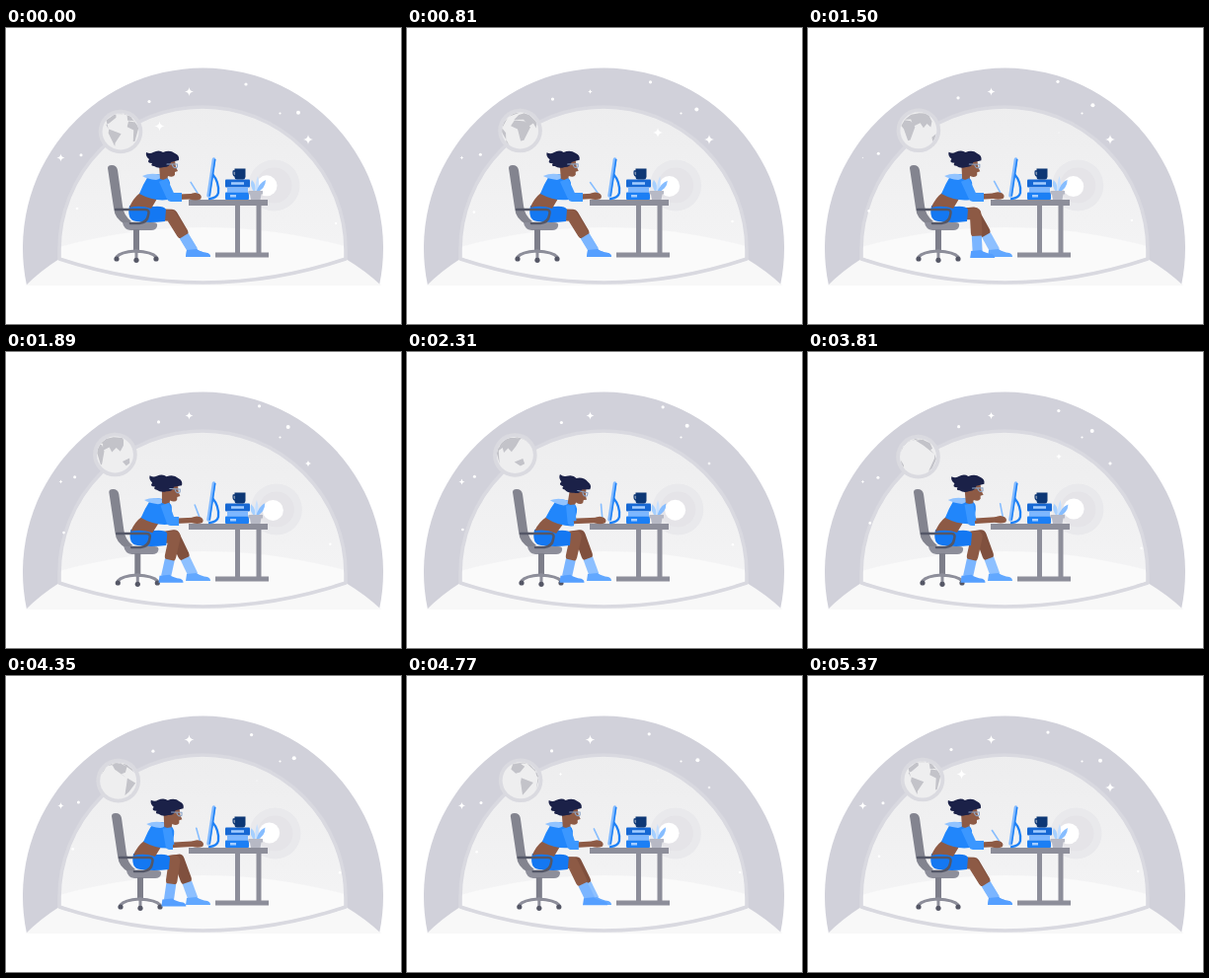
An HTML page that plays this animation: 400 by 300 pixels, repeating every 5400 ms.

```html
<!DOCTYPE html>
<html lang="en">
<head>
<meta charset="utf-8">
<title>Working under the dome</title>
<style>
html, body { margin: 0; width: 100%; height: 100%; overflow: hidden; background: #fff; }
svg { display: block; width: 100vw; height: 100vh; }
.line { fill: none; stroke-linecap: round; stroke-linejoin: round; }
.flat { stroke-linecap: butt; }
</style>
</head>
<body>
<svg viewBox="0 0 400 300">
  <defs>
    <linearGradient id="air" x1="0" y1="0" x2="0" y2="1">
      <stop offset="0" stop-color="#ededee"/><stop offset="1" stop-color="#f5f5f6"/>
    </linearGradient>
    <clipPath id="disc"><circle r="18.5"/></clipPath>
    <clipPath id="inside"><path d="M54 234V225A145 145 0 0 1 344 225V234Q200 282 54 234Z"/></clipPath>
  </defs>

  <path d="M21 261A182.5 182.5 0 1 1 378 261Z" fill="#d1d1da"/>
  <path d="M20 261Q35 246 54 234H344Q364 246 380 261Z" fill="#f8f8f8"/>
  <g clip-path="url(#inside)">
    <rect x="50" y="78" width="300" height="185" fill="url(#air)"/>
    <g id="halo"><circle r="26" fill="#e9e9ec"/><circle r="18" fill="#e5e4e8"/></g>
    <circle id="sun" r="10.5" fill="#fff"/>
    <path d="M50 223Q200 181 350 223V265H50Z" fill="#fafafa"/>
  </g>
  <path d="M54 234V225A145 145 0 0 1 344 225V234Q200 282 54 234Z" class="line" stroke="#d9d9e0" stroke-width="3.6"/>
  <g id="stars" fill="#fff"></g>

  <g id="globe">
    <circle r="22.3" fill="#dadae0"/><circle r="18.5" fill="#eeeeef"/>
    <path id="land" clip-path="url(#disc)" fill="#c3c3c9"/>
  </g>

  <g id="farLeg"></g>
  <g id="chair">
    <path d="M103 142Q103 139 107 139Q112 139 113 144L118 180Q119 190 127 196L121 199Q110 194 109 182Z" fill="#83848f"/>
    <path d="M118 197H149Q154 197 153 201Q152 205 147 205H126Q119 204 118 197Z" fill="#8d8e9a"/>
    <path d="M129 204H135V227H129Z" fill="#7d7e8a"/>
    <path d="M112 232Q116 227 131 226Q148 227 152 232M132 226V233" class="line" stroke="#8d8e9a" stroke-width="3"/>
    <g fill="#555766"><circle cx="112" cy="234" r="2.6"/><circle cx="132" cy="235.3" r="2.6"/><circle cx="152" cy="234" r="2.6"/></g>
  </g>
  <g id="nearLeg"></g>

  <g id="hips">
    <path d="M125 180Q133 177 149 181Q160 180 162 184L161 196Q145 198 132 196Q122 195 125 180Z" fill="#1478f2"/>
  </g>
  <g id="torso">
    <path d="M137 166L153 173L147 183Q136 179 125 182Q128 173 137 166Z" fill="#8d5a45"/>
    <path d="M144 150Q151 146 160 150Q167 153 166 160L164 174Q150 176 135 168Q139 158 144 150Z" fill="#2186fb"/>
    <path d="M138 150Q147 146 156 149Q158 153 152 154Q143 153 138 150Z" fill="#91c3ff"/>
  </g>
  <g id="head">
    <path d="M155 138L171 134L172 141L174 145L171 146L171 149Q169 152 164 150L163 155L156 153Z" fill="#8d5a45"/>
    <path d="M142 126Q146 128 149 126Q155 123 159 126Q166 123 171 127Q176 129 175 134Q171 135 167 136Q166 141 160 141Q154 143 150 140Q146 140 148 137Q142 137 145 133Q141 130 142 126Z" fill="#1b2148"/>
    <path d="M163 138H173.5V141Q170 143 168.5 139" class="line" stroke="#8ea6c8" stroke-width="1.1"/>
  </g>

  <g id="rest" class="line" stroke="#545767" stroke-width="2.6">
    <path d="M111 184H141Q146 184 144 190Q143 197 135 198H126"/>
  </g>

  <g fill="#8d8e9a">
    <path d="M232 179H237V230H232ZM253.5 179H258.5V230H253.5Z"/>
    <rect x="212" y="227.5" width="54" height="5"/>
    <rect x="185" y="174" width="80" height="6"/>
  </g>
  <path d="M209 148Q216 156 215 167Q214 172 206 173.2" class="line" stroke="#1d80f5" stroke-width="2.3"/>
  <path d="M210.5 133L205 170" class="line" stroke="#82baff" stroke-width="3.5"/>
  <path d="M211.7 133.5L206.3 170" class="line" stroke="#1d80f5" stroke-width="1.6"/>

  <rect x="222" y="153.5" width="25" height="8" rx="1" fill="#1768d3"/>
  <rect x="224" y="161.5" width="21" height="5" fill="#7db7ff"/>
  <rect x="222" y="166.5" width="24" height="7.5" rx="1" fill="#1c7ff4"/>
  <path d="M228 157.5H241M227 170.2H233" class="line flat" stroke="#a4cdff" stroke-width="2.5"/>
  <path d="M231.5 142.5H242.5V151Q242 153.5 240 153.5H234Q231.5 153.5 231.5 151Z" fill="#0d3775"/>
  <path d="M232 145H230.2Q229.5 150 232 150" class="line" stroke="#0d3775" stroke-width="1.3"/>
  <g id="leaves">
    <path d="M252 167Q246 160 249 154Q254 159 252 167Z" fill="#a6d0ff"/>
    <path d="M253 167Q252 157 255 150Q258 160 253 167Z" fill="#c6e0ff"/>
    <path d="M253 167Q256 157 263 154Q263 163 253 167Z" fill="#86bdff"/>
  </g>
  <path d="M245.5 165H260V168.5H258.5L257.5 174H248L247 168.5H245.5Z" fill="#b7b9c5"/>

  <g id="arm">
    <path id="forearm" class="line" stroke="#8d5a45" stroke-width="5.5"/>
    <path id="sleeve" class="line flat" stroke="#3b97ff" stroke-width="9"/>
    <g id="hand">
      <path d="M0 0L0 -13" class="line" stroke="#86bdff" stroke-width="1.6" id="pen"/>
      <path d="M-8 -2Q-2 -5 2 -2Q5 0 3 3Q-2 5 -8 3Z" fill="#8d5a45"/>
    </g>
  </g>
</svg>

<script>
const LOOP = 5400, STEP = 30, TAU = Math.PI * 2, RAD = Math.PI / 180;
const $ = id => document.getElementById(id);
const put = (id, x, y, more = "") => $(id).setAttribute("transform", `translate(${x} ${y}) ${more}`);
const mix = (a, b, k) => a + (b - a) * k;
const mix2 = (a, b, k) => [mix(a[0], b[0], k), mix(a[1], b[1], k)];
const ease = (a, b, t) => {
  const u = Math.min(1, Math.max(0, (t - a) / (b - a)));
  return u * u * (3 - 2 * u);
};
const line = pts => "M" + pts.map(p => p.join(" ")).join("L");

// Drifting dots: centre, cosine part, sine part, radius
const dots = [
  [251.5, 57, -8.5, 0, 0, -2.7, 1.6],
  [151, 73.5, -6, 1, 0, -2.5, 1.6],
  [289.5, 80.3, 6.5, 5.5, 0, -1.2, 2],
  [72, 127.5, 4, 1.3, 0, 0, 1.5],
  [277.5, 86.5, 0, 0, 0, 0, 1.1],
  [64, 180, 8, 3, -1, 6, 1.3],
  [333, 197, 1, 1, -5, -2, 1.2]
];

// Twinkles: place, then size at each beat
const beats = [0, 810, 1500, 2310, 3240, 4350, LOOP];
const twinkles = [
  [306, 113, 5, 5, 5, 2, 5, 0],
  [185.5, 64.5, 4.5, 2.2, 4, 4, 2.2, 5],
  [55.5, 131.5, 4, 2, 1, 3, 0, 3.5],
  [155.5, 99.5, 5, 0, 0, 0, 0, 0],
  [254, 106, 0, 5, 1, 0, 5, 1]
];
function sizeAt(sizes, t) {
  const i = beats.findIndex(b => b > t) - 1;
  return mix(sizes[i], sizes[(i + 1) % sizes.length], ease(beats[i], beats[i + 1], t));
}
$("stars").innerHTML =
  dots.map((d, i) => `<circle id="dot${i}" r="${d[6]}"/>`).join("") +
  twinkles.map((_, i) => `<path id="tw${i}" d="M0 -1Q.1 -.1 1 0Q.1 .1 0 1Q-.1 .1 -1 0Q-.1 -.1 0 -1Z"/>`).join("");

// Coarse coastlines as longitude, latitude pairs
const america = [
  [-165, 65, -85, 70, -60, 50, -82, 27, -97, 22, -80, 8, -122, 38],
  [-78, 8, -36, -7, -60, -38, -70, -54, -80, -5]
];
const africa = [-16, 15, -6, 35, 32, 31, 51, 11, 30, -32, 18, -34, 8, 5];
const asia = [-9, 37, 8, 60, 70, 73, 178, 67, 140, 54, 120, 30, 105, 10, 92, 22, 78, 8, 68, 24, 45, 13, 30, 38];
const australia = [114, -22, 142, -11, 153, -28, 138, -37];
const lands = [...america, africa, asia, australia];

function landPath(view) {
  let d = "";
  for (const land of lands) {
    const pts = [];
    let front = false;
    for (let i = 0; i < land.length; i += 2) {
      const lon = (land[i] - view) * RAD, lat = land[i + 1] * RAD;
      let x = Math.cos(lat) * Math.sin(lon), y = -Math.sin(lat);
      if (Math.cos(lon) > 0) front = true;
      else {
        // Points behind the globe slide out to its rim
        const r = Math.hypot(x, y) || 1;
        x /= r; y /= r;
      }
      pts.push([(x * 18.5).toFixed(2), (y * 18.5).toFixed(2)]);
    }
    if (front) d += line(pts) + "Z";
  }
  return d;
}

function makeLeg(id, skin, sock, shoe) {
  $(id).innerHTML =
    `<path class="line" stroke="${skin}" stroke-width="11.5"/>` +
    `<path class="line flat" stroke="${sock}" stroke-width="10"/>` +
    `<path fill="${shoe}" d="M1 -1L11 -2Q15 1 22 2Q25 3 25 6H0Z"/>`;
}
makeLeg("farLeg", "#80503e", "#8dc0ff", "#62a8ff");
makeLeg("nearLeg", "#8d5a45", "#7bb5ff", "#559fff");

function setLeg(id, hip, knee, heel) {
  const [skin, sock, shoe] = $(id).children;
  const ankle = [heel[0] + 7.5, heel[1]];
  const cuff = mix2(knee, ankle, 0.58);
  skin.setAttribute("d", line([hip, knee, mix2(knee, ankle, 0.5)]));
  sock.setAttribute("d", line([cuff, ankle]));
  shoe.setAttribute("transform", `translate(${heel})`);
}

function drawSky(t) {
  const a = t / LOOP * TAU, c = Math.cos(a), s = Math.sin(a);
  dots.forEach((d, i) => put("dot" + i, d[0] + d[2] * c + d[4] * s, d[1] + d[3] * c + d[5] * s));
  twinkles.forEach(([x, y, ...sizes], i) => put("tw" + i, x, y, `scale(${sizeAt(sizes, t)})`));
  put("sun", 268 - 4 * c, 159.8 + s * 0.8);
  put("halo", 273 - 1.5 * c, 159.5);
  put("globe", 112.5 + 3.5 * c, 105 - 1.2 * s);
  $("land").setAttribute("d", landPath(t / LOOP * 360 - 38));
  put("leaves", 0, 0, `rotate(${4 * Math.sin(2 * a)} 253 167)`);
}

function drawPerson(t) {
  const a = t / LOOP * TAU;
  const roll = ease(1650, 2280, t) - ease(4400, 5100, t);
  const step = ease(1100, 1766, t) - ease(4200, 4950, t);
  const nod = ease(1750, 2250, t) - ease(2550, 3100, t);
  const sway = Math.sin(4 * a), scrawl = Math.sin(12 * a);
  const dx = 4 * roll;

  for (const id of ["chair", "rest", "hips"]) put(id, dx, 0);
  put("torso", dx, 0, `rotate(${5 * nod + 0.4 * sway} 135 185)`);
  put("head", dx + 3.5 * nod + 0.3 * sway, 1.5 * nod, `rotate(${14 * nod + 1.2 * sway} 160 150)`);

  const hip = [150 + dx, 189];
  setLeg("farLeg", hip, [mix(168, 175, roll), mix(189.5, 186, step)], [182, 226]);
  setLeg("nearLeg", hip, [mix(167, 171, step), mix(190, 187, step)], [182 - 27.5 * step, 226 + 1.7 * step]);

  const hand = [194 + 3 * roll + 0.9 * scrawl, 170 + 0.4 * Math.cos(12 * a)];
  const shoulder = [159 + dx + 2.5 * nod, 154 + nod];
  const elbow = [167 - roll + nod, 171.5];
  const cuff = [178 - 9 * roll, 171.5];
  $("sleeve").setAttribute("d", line([shoulder, elbow, cuff]));
  $("forearm").setAttribute("d", line([elbow, hand]));
  put("hand", hand[0], hand[1]);
  put("pen", 0, -3, `rotate(${-32 + 20 * roll + 4 * nod + 4 * scrawl})`);
}

const start = performance.now();
function tick() {
  const t = Math.floor((performance.now() - start) % LOOP / STEP) * STEP;
  drawSky(t);
  drawPerson(t);
  requestAnimationFrame(tick);
}
tick();
</script>
</body>
</html>
```
